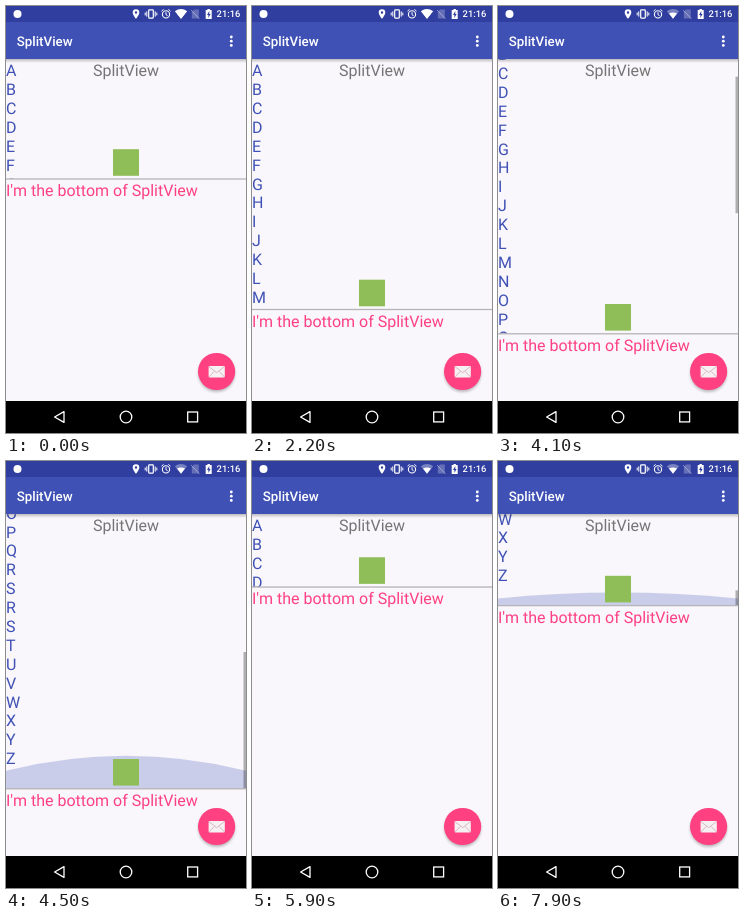
An HTML page that plays this animation: 240 by 427 pixels, repeating every 8 s.

```html
<!DOCTYPE html>
<html lang="en">
<head>
<meta charset="utf-8">
<title>SplitView</title>
<style>
  html, body { margin: 0; width: 100%; height: 100%; overflow: hidden; background: #f9f7fb; }
  svg { display: block; width: 100vw; height: 100vh; }
  text { font: 16px Roboto, sans-serif; text-rendering: geometricPrecision; }
  .letters { fill: #3f51b5; }
  .label { fill: #757575; text-anchor: middle; }
  .bottom { fill: #ff4081; }
  .title { font-size: 13.33px; font-weight: 500; fill: #fff; }
  .clock { font-size: 9.33px; font-weight: 500; fill: #fff; text-anchor: end; }
  .line { fill: none; stroke: #fff; }
</style>
</head>
<body>
<svg viewBox="0 0 240 427" preserveAspectRatio="none">
  <defs>
    <clipPath id="pane"><rect id="paneRect" y="53.3" width="240" height="120"/></clipPath>
    <linearGradient id="shade" x2="0" y2="1">
      <stop stop-color="#000" stop-opacity=".24"/>
      <stop offset="1" stop-color="#000" stop-opacity="0"/>
    </linearGradient>
    <filter id="blur" x="-30%" y="-30%" width="160%" height="160%"><feGaussianBlur stdDeviation="1.8"/></filter>
  </defs>
  <rect width="240" height="427" fill="#f9f7fb"/>

  <g clip-path="url(#pane)">
    <g id="letters" class="letters"></g>
    <text class="label" x="120" y="70.2">SplitView</text>
    <path id="glow" fill="#3f51b5"/>
    <rect id="bar" x="237.5" width="2.5" fill="#000"/>
  </g>

  <g id="split">
    <rect x="107" y="-29.8" width="26" height="26.6" fill="#8fbd57"/>
    <rect y="-.65" width="240" height="1.3" fill="#b5b4b7"/>
    <text class="bottom" y="17.1">I'm the bottom of SplitView</text>
  </g>

  <rect y="53" width="240" height="4" fill="url(#shade)"/>
  <rect width="240" height="53" fill="#3f51b5"/>
  <rect width="240" height="16" fill="#303f9f"/>
  <text class="title" x="10.7" y="39.9">SplitView</text>
  <g fill="#fff">
    <circle cx="225.3" cy="31" r="1.4"/>
    <circle cx="225.3" cy="35.2" r="1.4"/>
    <circle cx="225.3" cy="39.4" r="1.4"/>
  </g>

  <g fill="#fff">
    <circle cx="11.5" cy="8" r="4"/>
    <path fill-rule="evenodd" d="M130 3.2a3.3 3.3 0 0 1 3.3 3.3c0 2.4-3.3 6.3-3.3 6.3s-3.3-3.9-3.3-6.3a3.3 3.3 0 0 1 3.3-3.3zm0 2.1a1.2 1.2 0 1 0 0 2.4a1.2 1.2 0 1 0 0-2.4z"/>
    <rect class="line" x="142.7" y="3.9" width="4.6" height="8.2" rx=".5" stroke-width="1.2"/>
    <path class="line" d="M140.8 5.4v5.2M139.2 6.6v2.8M149.2 5.4v5.2M150.8 6.6v2.8"/>
    <circle class="line" cx="160" cy="8.4" r="3.6" stroke-width="1.1"/>
    <path class="line" d="M160 6.2v2.5l1.6 1M155.5 5.2l2.1-1.8M164.5 5.2l-2.1-1.8"/>
    <path id="wifi" d="M168.8 5.2q6.2-4.2 12.4 0L175 12.8z"/>
    <path d="M171 7.5q4-2.2 8 0L175 12.8z"/>
    <path opacity=".25" d="M188 3.5h4.8v9h-7V6z"/>
    <path class="line" opacity=".45" d="M185 4l8.4 8.8" stroke-width=".9"/>
    <path d="M201.5 3h2.4v1h1.8v9h-6V4h1.8z"/>
    <path fill="#303f9f" d="M203.3 5l-2.3 4h1.4v3l2.2-4.1h-1.3z"/>
  </g>
  <text class="clock" x="234.3" y="11.3">21:16</text>

  <circle cx="210.6" cy="367.6" r="18.2" opacity=".28" filter="url(#blur)"/>
  <circle cx="210.6" cy="365.5" r="18.6" fill="#ff4081"/>
  <rect x="202.6" y="360" width="16.2" height="11.4" rx=".8" fill="#f5f1f3"/>
  <path d="M202.9 360.6l7.8 6 7.8-6M202.9 371l5.4-5.6M218.5 371l-5.4-5.6" fill="none" stroke="#d3a6b5" stroke-width=".8"/>

  <rect y="395" width="240" height="32"/>
  <g class="line" stroke-width="1.3">
    <path d="M58 405.6v10.8l-9.4-5.4z" stroke-linejoin="round"/>
    <circle cx="120" cy="411" r="5.8"/>
    <rect x="181.7" y="406" width="9.9" height="9.9"/>
  </g>
</svg>
<script>
  const LOOP = 8000, STEP = 100;
  const TOP = 53.3, PITCH = 18.89, CONTENT = 552;
  const el = id => document.getElementById(id);

  const progress = (t, from, to) => Math.min(1, Math.max(0, (t - from) / (to - from)));
  const smooth = u => u * u * (3 - 2 * u);
  const pulse = (t, from, to, peak) => peak * Math.sin(Math.PI * progress(t, from, to));
  const shown = (t, from, to) => progress(t, from, from + 100) * (1 - progress(t, to, to + 250));

  // Each drag eases from wherever the last one ended: [start, end, value].
  const drag = (t, value, moves) => moves.reduce(
    (v, [from, to, target]) => v + (target - v) * smooth(progress(t, from, to)), value);

  const dividerAt = t => drag(t, 173, [
    [1100, 2200, 303.5], [2300, 2900, 228], [2900, 3300, 327.8],
    [5350, 5950, 122], [6770, 7200, 144.6]
  ]);
  const scrollAt = t => drag(t, 0, [[4000, 4450, 277], [4700, 5200, 0], [7300, 7850, 460]]);

  // An arc bulging away from an edge; dir is 1 below it, -1 above it.
  function arc(edge, height, dir) {
    const side = edge + dir * height * .55;
    const control = side + dir * height * .9;
    return `M0 ${edge}V${side}Q120 ${control} 240 ${side}V${edge}z`;
  }

  function set(id, attrs) {
    for (const name in attrs) el(id).setAttribute(name, attrs[name]);
  }

  [..."ABCDEFGHIJKLMNOPQRSRSTUVWXYZ"].forEach((letter, i) => {
    const row = document.createElementNS("http://www.w3.org/2000/svg", "text");
    row.setAttribute("y", 70.2 + i * PITCH);
    row.textContent = letter;
    el("letters").append(row);
  });

  function draw(t) {
    const divider = dividerAt(t), scroll = scrollAt(t);
    const view = divider - TOP;
    const topGlow = pulse(t, 5150, 5450, 18);
    const bottomGlow = pulse(t, 4300, 4700, 33) + pulse(t, 7800, 8200, 18.4);
    const atTop = topGlow > .01;

    set("paneRect", { height: view });
    set("split", { transform: `translate(0 ${divider})` });
    set("letters", { transform: `translate(0 ${-scroll})` });
    set("bar", {
      y: TOP + scroll * view / CONTENT,
      height: view * view / CONTENT,
      opacity: .3 * (shown(t, 4000, 5450) + shown(t, 7300, LOOP))
    });
    set("glow", {
      d: atTop ? arc(TOP, topGlow, 1) : arc(divider, bottomGlow, -1),
      opacity: atTop ? topGlow * .007 : .25
    });
    set("wifi", { opacity: t < 2500 ? 1 : .35 });
  }

  function frame() {
    draw(Math.floor(performance.now() % LOOP / STEP) * STEP);
    requestAnimationFrame(frame);
  }
  frame();
</script>
</body>
</html>
```
